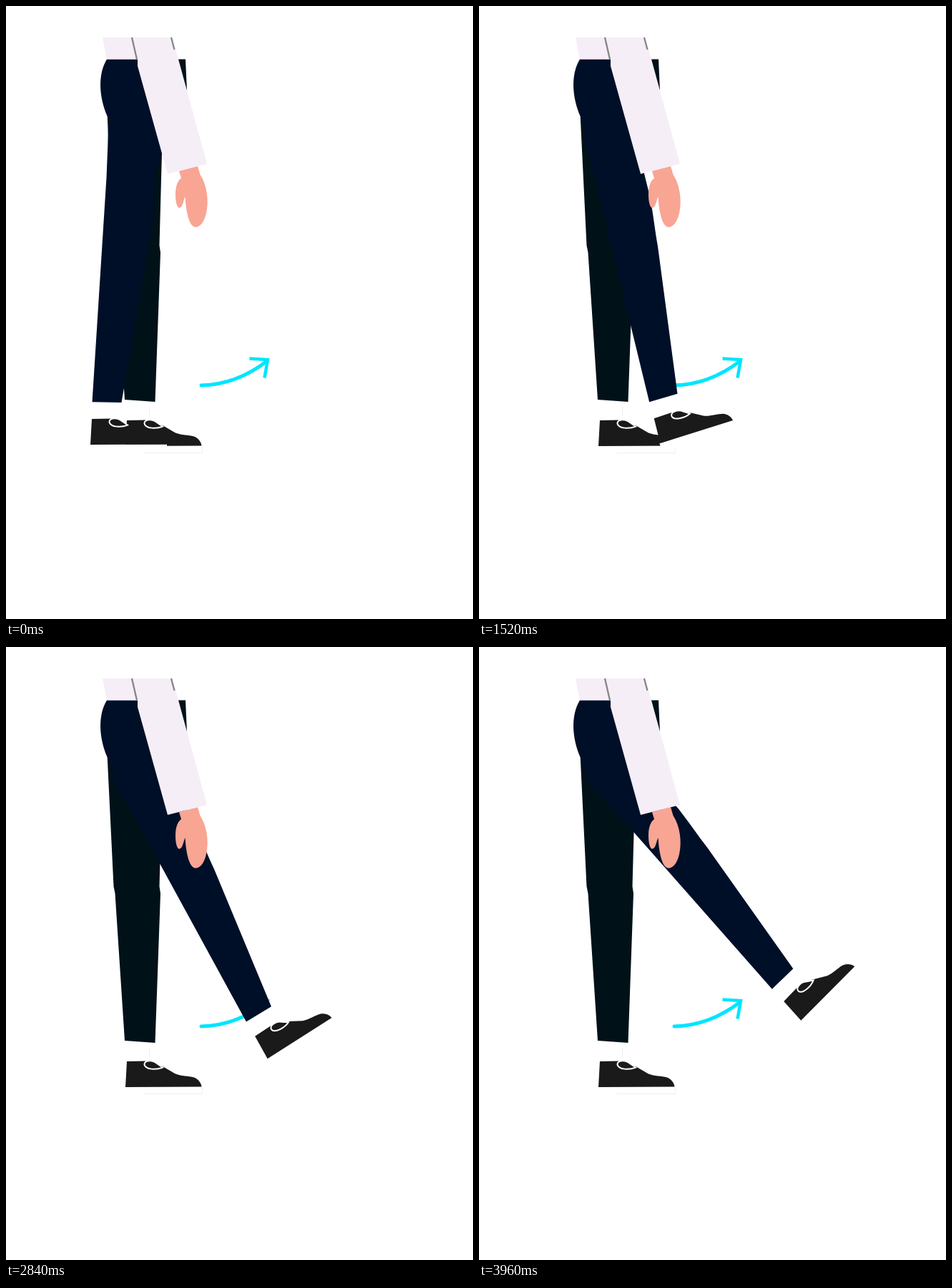
Recreate the animation shown at these times as an HTML page with a canvas. Size 653 px wide and 858 px high, loop 4 s.

```html
<!DOCTYPE html>
<html lang="en">
<head>
<meta charset="utf-8">
<title>Leg swing</title>
<style>
  html, body { margin: 0; width: 100%; height: 100%; overflow: hidden; background: #fff; }
  canvas { display: block; width: 653px; height: 858px; }
</style>
</head>
<body>
<canvas id="stage" width="653" height="858"></canvas>
<script>
const ctx = document.getElementById('stage').getContext('2d');

const LOOP = 4000, STEP = 40, STEPS = LOOP / STEP;
const RAD = Math.PI / 180;

// The ankle travels on an arc around the hip while the leg itself turns slightly less.
const HIP = { x: 179.7, y: 188.5 };
const ANKLE = { x: 119, y: 584 };
const ARC = 47.4 * RAD, TURN = 45 * RAD;

const NAVY = '#000f28', DARK = '#001118', BLACK = '#1a1a1a', WHITE = '#fff';
const SHIRT = '#f5eef7', SKIN = '#f8a594', CYAN = '#00e5ff', GREY = '#858585', FAINT = '#f0f0f0';

const fill = (d, color) => {
  ctx.fillStyle = color;
  ctx.fill(new Path2D(d));
};

const line = (d, color, width, cap = 'butt') => {
  ctx.strokeStyle = color;
  ctx.lineWidth = width;
  ctx.lineCap = cap;
  ctx.lineJoin = 'miter';
  ctx.stroke(new Path2D(d));
};

function shoe(dx, dy) {
  ctx.save();
  ctx.translate(dx, dy);
  fill('M166 615.5H274V627H166Z', WHITE);
  fill('M169 580L195 579.5L219 587L237 597.5C246 601 255 600 263 602.5C269 605 273 610 273.5 615.5L167 616Z', BLACK);
  const loop = 'M193.5 584.5C193 578 205 577.5 211 583L219 588.5C211 592 195 592 193.5 584.5Z';
  fill(loop, BLACK);
  line(loop, WHITE, 2);
  ctx.restore();
}

function arrow() {
  line('M273 531Q322 530 365 497', CYAN, 5, 'round');
  line('M340.5 493.5L366 495L361.5 520.5', CYAN, 4.5);
}

function backLeg() {
  fill('M141.5 150L150.5 335L152.5 345L166 551L208.5 554L216 345L214.5 335L218 205V150Z', DARK);
  fill('M236 74.5H251L253 119Z', DARK);
  shoe(0, 0);
  line('M193 625.5H274.5V616', FAINT, 1);
  line('M200.5 561V574', FAINT, 1);
}

function frontLeg(progress) {
  ctx.save();
  ctx.translate(HIP.x, HIP.y);
  ctx.rotate(-ARC * progress);
  ctx.translate(ANKLE.x - HIP.x, ANKLE.y - HIP.y);
  ctx.rotate((ARC - TURN) * progress);
  ctx.translate(-ANKLE.x, -ANKLE.y);
  fill('M127 552H160L165 579H126Z', WHITE);
  shoe(-49, -2);
  fill('M143 165L142.3 195L140.5 240L120.5 554.3L161.5 555L196.5 350L198.5 335L203 307L206.5 283L208.5 250L209.5 235L200 165Z', NAVY);
  ctx.restore();
}

function body() {
  fill('M141 74.5H186L218 206L214 225L152 185L142 155C130 128 128 96 141 74.5Z', NAVY);
  fill('M135 44H231L240 74.5H141Z', SHIRT);
  fill('M242 231L268 224L271.5 236C281 250 284 273 280 290C277 303 271 309.5 265 309.5C257 309 252 292 250.5 267C248 272 247 283 242 282.5C238 282 236 267 237.5 256C239 248 241 244 245 241Z', SKIN);
  fill('M177 44H231L239 67L281 221L226 235L184 84V74Z', SHIRT);
  line('M176 44L183 74.5M231 44L235.5 61', GREY, 2.3);
}

function draw(time) {
  const step = Math.floor((time % LOOP) / STEP);
  ctx.fillStyle = WHITE;
  ctx.fillRect(0, 0, 653, 858);
  arrow();
  backLeg();
  frontLeg(step / (STEPS - 1));
  body();
}

const start = performance.now();
function tick() {
  draw(performance.now() - start);
  requestAnimationFrame(tick);
}
tick();
</script>
</body>
</html>
```
